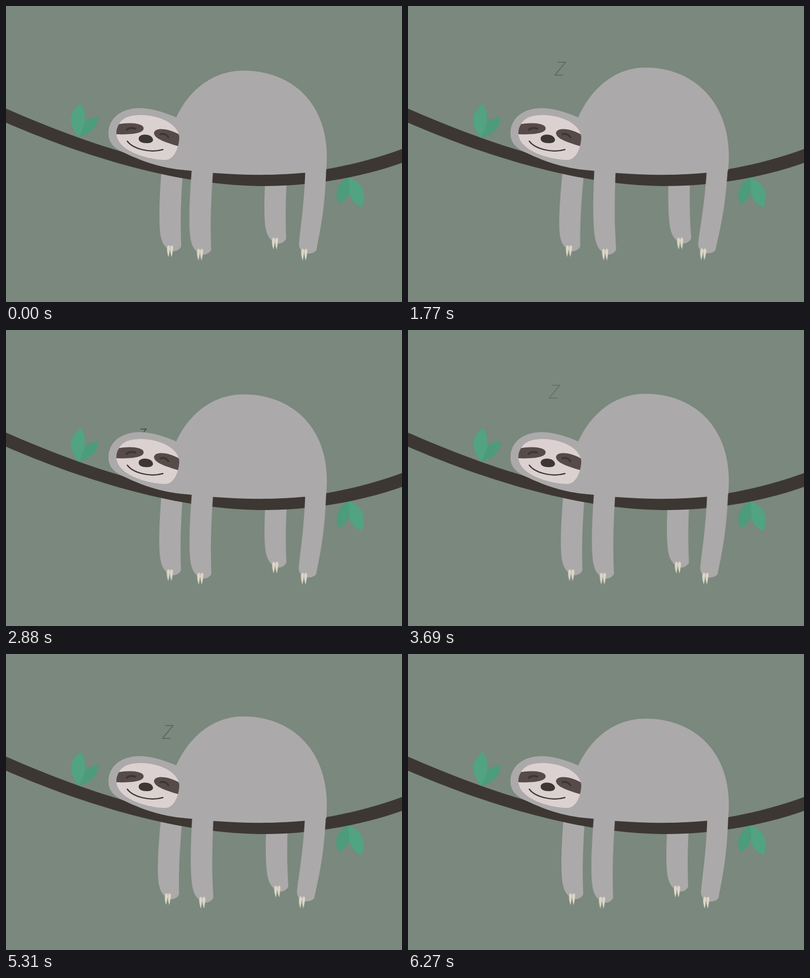
An HTML page that plays this animation: 800x600 px, repeating every 6.3 s.

```html
<!DOCTYPE html>
<html lang="en">
<head>
<meta charset="utf-8">
<title>Sleeping sloth</title>
<style>
  html, body { margin: 0; width: 100%; height: 100%; overflow: hidden; background: #7a887d; }
  svg { display: block; width: 100vw; height: 100vh; }

  .fur { fill: #aca9aa; }
  .bark { fill: #3d3733; }
  .claw { fill: #dcd6c6; }
  .leaf { fill: #52a380; }
  .line { fill: none; stroke: #3d3733; stroke-linecap: round; }

  /* One breath in or out takes a quarter of the loop. */
  .breath, .swing {
    animation: 1575ms cubic-bezier(.37, 0, .63, 1) infinite alternate;
  }
  .breath { animation-name: breathe; }
  .swing { animation-name: swing; transform-origin: 335px 290px; --turn: -1.85deg; }
  .back { --turn: 1.85deg; }
  .hip { transform-origin: 626px 300px; }
  @keyframes breathe {
    from { d: path("M340 235C362 180 410 131 480 131C575 131 652 195 648 315L647 333L604 338Q520 346 420 338.5L340 330Z"); }
    to { d: path("M340 235C362 178 410 124.5 480 124.5C575 124.5 652 193 648 315L647 333L604 338Q520 346 420 338.5L340 330Z"); }
  }
  @keyframes swing { to { transform: rotate(var(--turn)); } }

  .z {
    font: italic 300 39px "Open Sans", Lato, sans-serif;
    text-anchor: middle;
    fill: #3d3733;
    animation: rise 6300ms linear infinite;
  }
  .z1 { --x: 312.5px; --y: 125px; animation-delay: -5570ms; }
  .z2 { --x: 298px; --y: 128px; animation-delay: -3696ms; }
  .z3 { --x: 335.5px; --y: 160px; animation-delay: -2020ms; }
  @keyframes rise {
    0% { transform: translate(268px, 247px) scale(.62); opacity: 1; }
    13% { opacity: 1; }
    19.05%, 100% { transform: translate(var(--x), var(--y)) scale(1.05); opacity: 0; }
  }

  .flutter { animation: 6300ms ease-in-out infinite; }
  .upper { animation-name: upper; }
  .lower { animation-name: lower; }
  @keyframes upper {
    0%, 100% { transform: none; }
    13.8% { transform: translate(0, .5px); }
    28.1%, 45.7% { transform: translate(.3px, 1.5px); }
    71.9% { transform: translate(1.5px, .8px); }
    84.3% { transform: translate(.2px, 1.5px); }
    99.5% { transform: translate(1px, 1.5px); }
  }
  @keyframes lower {
    0%, 100% { transform: none; }
    13.8% { transform: translate(0, 1px); }
    28.1% { transform: translate(-.8px, .5px); }
    45.7% { transform: translate(0, -.5px); }
    71.9% { transform: translate(-1px, .5px); }
    84.3%, 99.5% { transform: translate(-.8px, 0); }
  }
</style>
</head>
<body>
<svg viewBox="0 0 800 600">
  <defs>
    <pattern id="dots" width="4" height="4" patternUnits="userSpaceOnUse">
      <rect width="4" height="4" fill="#52a380"/>
      <circle cx="1" cy="1" r=".65" fill="#347a60"/>
      <circle cx="3" cy="3" r=".65" fill="#347a60"/>
    </pattern>
    <path id="nail" class="claw" d="M-3 7C-3 -2 3 -2 3 4C2.600 12 1 19 0 23.500C-2 18 -3 12 -3 7Z"/>
    <g id="claws">
      <use href="#nail" x="-3.2"/>
      <use href="#nail" x="3.2"/>
    </g>
    <g id="leg">
      <path class="fur" d="M316 310C310 380 307 450 314 472C318 488 330 497 340 497C347 496 352 492 354 487C352 440 353 390 359 310Z"/>
      <use href="#claws" x="331.5" y="485.5"/>
    </g>
    <path id="face" d="M228 240C236 225 252 221 275 221C305 222 345 235 350 264C351 280 342 312 322 312C290 312 224 295 223 258C223 250 225 245 228 240Z"/>
    <clipPath id="inFace"><use href="#face"/></clipPath>
  </defs>

  <rect width="800" height="600" fill="#7a887d"/>

  <!-- far legs -->
  <g class="swing back"><use href="#leg"/></g>
  <g transform="translate(212 -15.5)"><g class="swing"><use href="#leg"/></g></g>

  <g class="flutter upper">
    <path fill="url(#dots)" d="M147 265C150 245 158 224 187 225C184 245 172 260 147 265Z"/>
    <path class="leaf" d="M146 266C135 248 128 238 132 222C135 210 142 204 150 197C157 204 161 218 159 233C157 248 151 257 146 266Z"/>
  </g>
  <g class="flutter lower">
    <path class="leaf" d="M692 347C708 353 724 366 723.5 385C723 397 721 403 719 408C706 402 696 393 693.5 378C691 365 690 356 692 347Z"/>
    <path fill="url(#dots)" d="M692 347C677 355 667 368 668 386C669 394 671 398 674 402C686 393 694 385 694 372C694 362 693 355 692 347Z"/>
  </g>

  <path class="bark" d="M0 208C150 274 340 342 520 342C610 342 710 323 800 290V318C710 350 610 365 520 365C340 365 140 297.500 0 236.500Z"/>

  <text class="z z1">Z</text>
  <text class="z z2">Z</text>
  <text class="z z3">Z</text>

  <path class="fur breath"/>

  <!-- near legs -->
  <g transform="translate(60.5 7)"><g class="swing"><use href="#leg"/></g></g>
  <g class="swing back hip">
    <path class="fur" d="M605 315C604 390 596 440 592 480C591 490 596 500 610 502C618 502 624 499 627 495C638 440 645 400 647 325L645 315Z"/>
    <use href="#claws" x="602.5" y="492.5"/>
  </g>

  <!-- head -->
  <path class="fur" d="M344 226C318 214 290 207 270 207C232 207 207 228 207 258C207 280 222 290 240 298C280 317 320 331 378 334L400 300Z"/>
  <use href="#face" fill="#dbd1d0"/>
  <g fill="#574b4a" clip-path="url(#inFace)">
    <path d="M220 241C243 235 278 236 278 248C278 258 255 261 220 260Z"/>
    <path d="M356 265C338 250 302 243 299 257C299 270 325 277 354 286Z"/>
  </g>
  <path class="line" stroke-width="4" d="M244 251Q250 245 261 248.500M312 260Q322 257 328 266"/>
  <path class="bark" d="M268 269C268 262 277 260 284 261C292 262 297 266 297 272C296 277 290 278 284 278C275 278 268 275 268 269Z"/>
  <path class="line" stroke-width="2.4" d="M245 274C256 289 290 299 317 291"/>
</svg>
</body>
</html>
```
